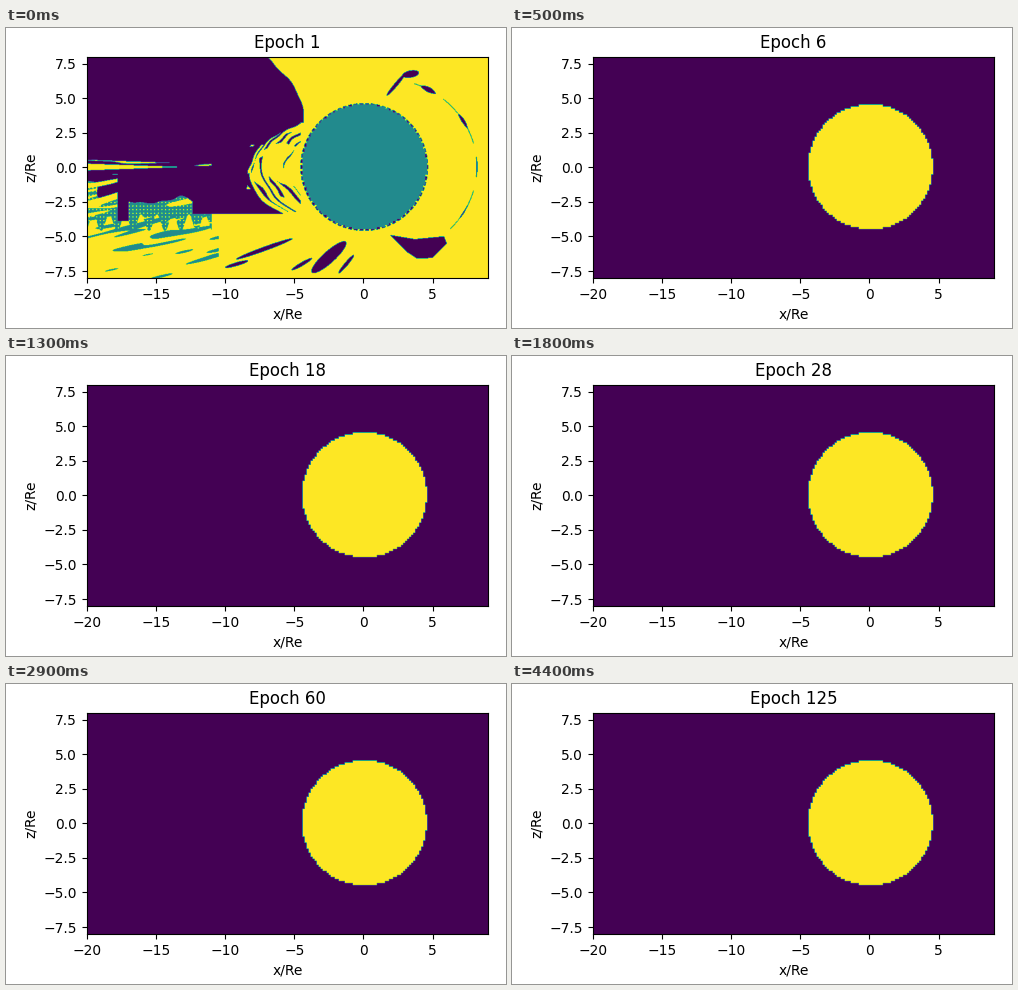
A matplotlib script for the animation above (4500 ms loop, 500 by 300 pixels).

```python
import matplotlib.pyplot as plt
import numpy as np
from itertools import chain
from matplotlib.animation import FuncAnimation
from matplotlib.path import Path

W, H = 500, 300
LEFT, TOP, RIGHT, BOTTOM = 80.7, 28.6, 482, 250
EXTENT = (-20, 9, -8, 8)
NX, NZ = 800, 440
LOBE, BODY, SHEATH = 0, 0.957, 2
EPOCHS = list(chain(range(1, 10), range(10, 30, 2), range(30, 60, 3),
                    range(60, 100, 4), range(100, 126, 5)))

x, z = np.meshgrid(-20 + (np.arange(NX) + 0.5) * 29 / NX,
                   8 - (np.arange(NZ) + 0.5) * 16 / NZ)

# The planet is masked on a coarser grid, which gives it a stepped edge
col = np.floor((x + 19.965) / 0.145)
row = np.floor((z - 0.02) / 0.145) + 0.5
planet = np.hypot(col * 29 / 199 - 20, row * 16 / 110) < 4.525


def noise(u, v, rng, waves=14):
    """Smooth random field with unit variance."""
    total = np.zeros_like(u)
    for _ in range(waves):
        a, b = rng.normal(size=2)
        total += np.cos(a * u + b * v + rng.uniform(0, 2 * np.pi))
    return total * np.sqrt(2 / waves)


def leaf(cx, cz, length, width, angle=0):
    """Mask of a slender ellipse, tilted anticlockwise in degrees."""
    a = np.radians(angle)
    u = (x - cx) * np.cos(a) + (z - cz) * np.sin(a)
    v = (z - cz) * np.cos(a) - (x - cx) * np.sin(a)
    return (2 * u / length) ** 2 + (2 * v / width) ** 2 < 1


def draw_tail(g, rng):
    # Nested bows q open towards the planet; the lobe lies outside them
    ragged = noise(2 * x, 2 * z, rng)
    q = -x + 0.28 * z ** 2 + 0.15 * ragged
    edge = -4.4 - 0.12 * (z - 3.3) ** 2 + 0.12 * ragged
    floor = np.where(x > -12.4, -3.4, -2.4 + 0.25 * ragged)
    floor = np.where(x < -17, -3.9, floor)
    floor = np.where(x < -17.8, -1.6 + 0.3 * ragged, floor)
    lobe = np.where(z > 3.2, x < edge, q > 8.3 - 0.2 * z) & (z > floor)

    # Teal weave with hanging columns, thinning into slanted streaks
    slant = noise(0.9 * x, 7 * (z - 0.2 * x), rng)
    depth = -4 + 0.6 * np.cos(2 * np.pi * x / 1.15)
    weave = (x < -11) & (z < floor) & (z > depth) & (slant > -0.9)
    streaks = (x < -10.5) & (z <= depth) & (slant > 0.9 - 0.25 * (z + 5))
    g[weave | streaks] = BODY
    g[weave & (np.sin(24 * x) + np.sin(24 * z) > 1.2)] = SHEATH
    g[lobe] = LOBE
    g[(x < -17.8) & (z < -0.5) & (z > -3) & (slant > 0.6)] = SHEATH

    # Slivers along the bows
    broken = noise(3 * q, 1.6 * z, rng)
    stripe = np.cos(9 * q + broken)
    bow = (np.abs(z) < 3.25) & (x < -4.6)
    g[bow & (q > 5.6) & (q < 8.3) & (stripe > 0.55) & (broken > -0.2)] = LOBE
    g[bow & lobe & (q < 9.2) & (np.abs(z) < 1.6) & (stripe > 0.4)
      & (broken > 0)] = SHEATH

    # Current sheet
    flow = noise(0.9 * x, 12 * z, rng)
    sheet = (x < -11) & (np.abs(z - 0.15) < 0.035 * (-9.5 - x))
    g[sheet & (flow > 0.7)] = BODY
    g[sheet & (flow > 1.0)] = SHEATH
    g[np.abs(z) < 0.035 * (-13 - x)] = SHEATH


def draw_boundary(g):
    # Thin oval line that swells into beads every 30 degrees
    angle = np.arctan2(z, x - 1.41)
    gap = np.abs(np.hypot((x - 1.41) / 6.72, z / 6.36) - 1) * 6.5
    arc = (angle > -0.75) & (angle < 1.3)
    bead = (0.06 + 0.22 * np.clip(angle, 0, 1)) * (np.cos(12 * angle) - 0.35)
    g[arc & (gap < 0.025) & (np.cos(17 * angle) > -0.3)] = BODY
    g[arc & (gap < bead)] = LOBE

    # Cusps
    g[leaf(2.3, 5.95, 2.1, 0.25, 50) | leaf(3.35, 6.7, 1.2, 0.5, 10)] = LOBE
    south = Path([(1.85, -4.9), (3.65, -5.2), (5.75, -5), (5.95, -5.5),
                  (4.9, -6.55), (3.8, -6.6), (3.05, -6.1)])
    inside = south.contains_points(np.c_[x.ravel(), z.ravel()])
    g[inside.reshape(x.shape)] = LOBE


def first_field():
    rng = np.random.default_rng(7)
    g = np.full(x.shape, float(SHEATH))
    draw_tail(g, rng)
    draw_boundary(g)

    # Streaks below the planet
    g[leaf(-7.2, -5.9, 4.3, 0.3, 20) | leaf(-2.55, -6.5, 3.3, 0.85, 42)] = LOBE
    for cx, tilt in ((-9.2, 16), (-4.5, 30), (-1.3, 50)):
        g[leaf(cx, -7, 1.7, 0.25, tilt)] = LOBE

    dashes = np.cos(70 * np.arctan2(z, x)) > -0.4
    g[(np.hypot(x, z) < 4.6) & dashes] = LOBE
    g[planet] = BODY
    return g


def second_field():
    g = np.where(planet, BODY, LOBE)
    g[leaf(-15.5, 0.26, 1.5, 0.17) | leaf(-15.2, -0.1, 0.3, 0.14)
      | leaf(-14.2, 0.28, 0.2, 0.1) | leaf(7.15, -4.05, 0.12, 0.1)] = BODY
    g[leaf(-15.8, 0.24, 0.8, 0.17)] = SHEATH
    return g


early = [first_field(), second_field()]
settled = planet.astype(float)

fig = plt.figure(figsize=(W / 100, H / 100), dpi=100)
ax = fig.add_axes([LEFT / W, 1 - BOTTOM / H,
                   (RIGHT - LEFT) / W, (BOTTOM - TOP) / H])
image = ax.imshow(settled, extent=EXTENT, aspect="auto")
ax.set_xlabel("x/Re")
ax.set_ylabel("z/Re")
title = ax.set_title("")


def update(i):
    data = early[i] if i < len(early) else settled
    image.set_data(data)
    image.set_clim(data.min(), data.max())
    title.set_text(f"Epoch {EPOCHS[i]}")
    return image, title


anim = FuncAnimation(fig, update, frames=len(EPOCHS), interval=100,
                     repeat=True, repeat_delay=0, blit=False)
plt.show()
```
